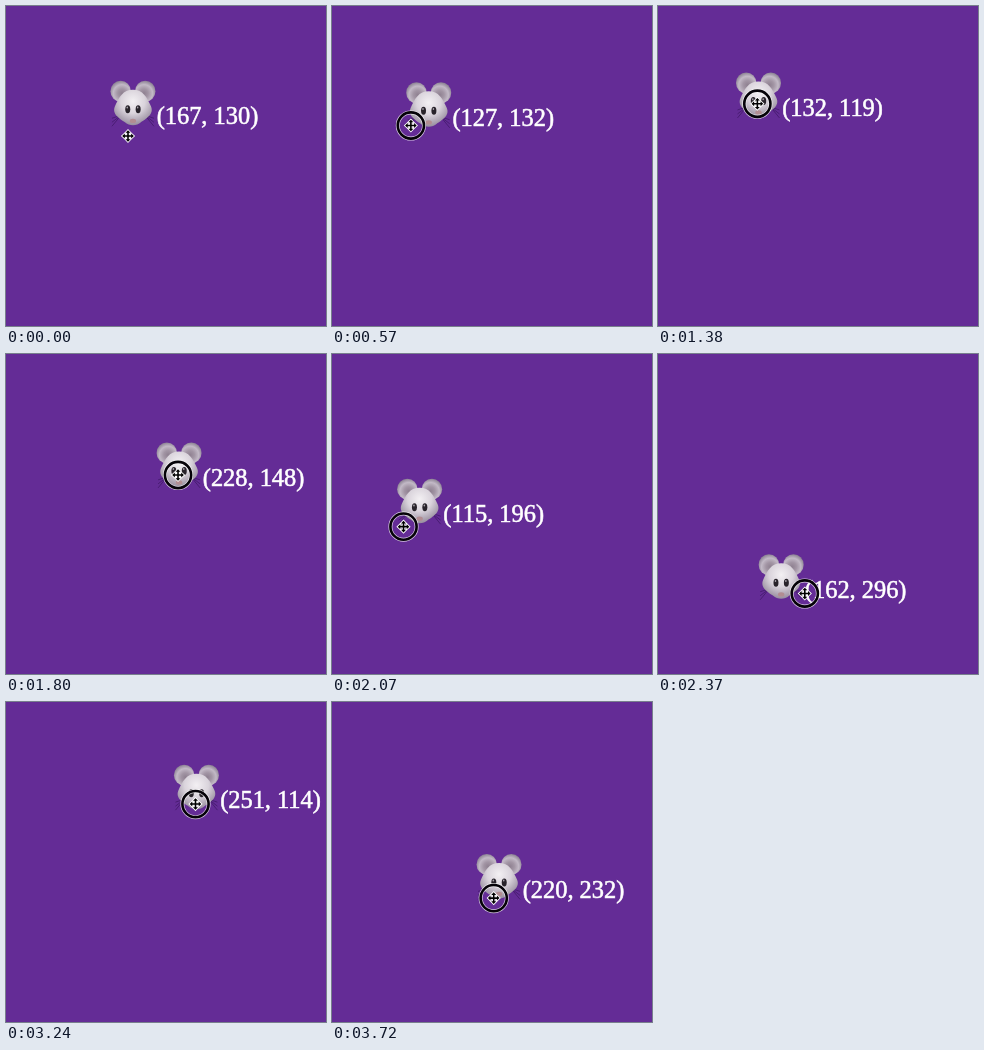
An HTML page with a canvas for the animation above (3.75 s loop, 320 by 320 pixels).

```html
<!DOCTYPE html>
<html lang="en">
<head>
<meta charset="utf-8">
<title>Mouse position</title>
<style>
  html, body { margin: 0; width: 100%; height: 100%; overflow: hidden; background: #642c96; }
  canvas { display: block; }
</style>
</head>
<body>
<canvas id="stage" width="320" height="320"></canvas>
<script>
const ctx = document.getElementById('stage').getContext('2d');
const LOOP = 3750, STEP = 30, SCALE = 0.756, LEAD = 60, PRESS = 270;

// The hand swings between turning points on each axis: [time in ms, coordinate]
const turnsX = [[420, 167], [710, 90], [1140, 196], [1410, 130], [1835, 230],
  [2150, 93], [2700, 290], [3260, 251], [4200, 187]];
const turnsY = [[270, 130], [500, 125], [1010, 264], [1400, 118], [1840, 149],
  [2480, 309], [3040, 98], [4300, 337.5]];

const ease = u => u * u * (3 - 2 * u);
const mix = (a, b, k) => a + (b - a) * k;

function swing(turns, t) {
  const i = turns.findIndex(([time]) => time > t);
  if (i === 0) return turns[0][1];
  const [t0, v0] = turns[i - 1], [t1, v1] = turns[i];
  return mix(v0, v1, ease((t - t0) / (t1 - t0)));
}

const positionAt = t => [swing(turnsX, t), swing(turnsY, t)];

function ellipse(x, y, rx, ry, fill) {
  ctx.beginPath();
  ctx.ellipse(x, y, rx, ry, 0, 0, 2 * Math.PI);
  ctx.fillStyle = fill;
  ctx.fill();
}

function shade(x, y, r, ...colors) {
  const g = ctx.createRadialGradient(x, y, 0, x, y, r);
  colors.forEach((c, i) => g.addColorStop(i / (colors.length - 1), c));
  return g;
}

const head = new Path2D(`M0 -14.5C10 -14.5 14 -7 18 2C21.5 10 13 14.5 8 18
  C4 22 -4 22 -8 18C-13 14.5 -21.5 10 -18 2C-14 -7 -10 -14.5 0 -14.5Z`);

function drawMouse() {
  ctx.strokeStyle = 'rgba(62, 24, 100, .7)';
  ctx.lineWidth = 1;
  for (const side of [-1, 1]) {
    ctx.beginPath();
    for (const y of [14, 18, 22]) {
      ctx.moveTo(side * 12, 11);
      ctx.lineTo(side * 21, y);
    }
    ctx.stroke();
    ellipse(side * 12.3, -13, 10.2, 10.5,
      shade(side * 11, -11, 13, '#8f8191', '#a295a4', '#c2b9c6', '#857b8d'));
  }
  ctx.fillStyle = shade(0, -3, 24, '#f3f0f3', '#dad4dc', '#968c9d');
  ctx.fill(head);
  for (const side of [-1, 1]) {
    ellipse(side * 5.2, 5, 2.5, 4, '#28232a');
    ellipse(side * 5.2 - 0.5, 3.2, 0.8, 1, '#a9a3ab');
  }
  ellipse(0, 16.6, 3.2, 2.2, '#b28d92');
}

const arrows = new Path2D();
const arm = new Path2D('M-.8 0V-3.2H-2.5L0 -5.8L2.5 -3.2H.8V0Z');
for (let k = 0; k < 4; k++) arrows.addPath(arm, new DOMMatrix().rotate(90 * k));

function drawPointer(pressed) {
  if (pressed) {
    for (const [color, width] of [['rgba(255, 255, 255, .75)', 4], ['#050208', 2.6]]) {
      ctx.beginPath();
      ctx.arc(0, 0, 13.1, 0, 2 * Math.PI);
      ctx.strokeStyle = color;
      ctx.lineWidth = width;
      ctx.stroke();
    }
  }
  ctx.strokeStyle = '#fff';
  ctx.lineWidth = 1.8;
  ctx.stroke(arrows);
  ctx.fillStyle = '#000';
  ctx.fill(arrows);
}

function at(x, y, draw) {
  ctx.save();
  ctx.translate(x, y);
  draw();
  ctx.restore();
}

function drawLabel(text) {
  ctx.font = '24.4px "Liberation Serif", Times, serif';
  ctx.fillStyle = ctx.strokeStyle = '#fff';
  ctx.lineWidth = 0.6;
  ctx.fillText(text, 0, 0);
  ctx.strokeText(text, 0, 0);
}

function render(t) {
  const [x, y] = positionAt(t).map(Math.round);
  const px = x * SCALE, py = y * SCALE;
  ctx.fillStyle = '#642c96';
  ctx.fillRect(0, 0, 320, 320);
  at(px + 0.7, py, drawMouse);
  at(px + 24.4, py + 20.2, () => drawLabel(`(${x}, ${y})`));

  // The pointer hovers below at first, then leads the drag
  const [leadX, leadY] = positionAt(t + LEAD);
  const grab = ease(Math.min(t / PRESS, 1));
  at(mix(122, leadX * SCALE, grab), mix(130, leadY * SCALE + 8, grab),
    () => drawPointer(t >= PRESS));
}

const start = performance.now();
function tick() {
  const t = (performance.now() - start) % LOOP;
  render(Math.floor(t / STEP) * STEP);
  requestAnimationFrame(tick);
}
tick();
</script>
</body>
</html>
```
